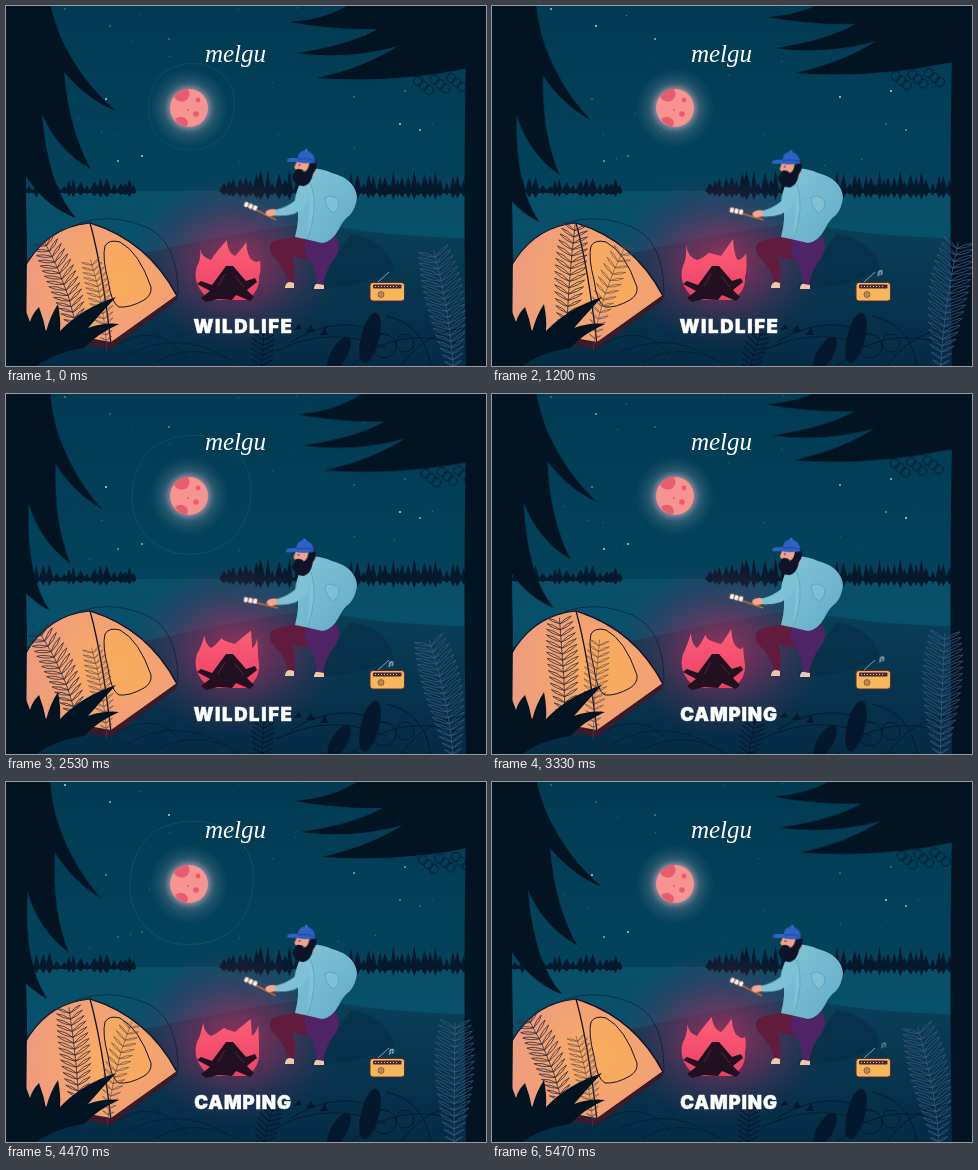
Animation of 480x360 px, one loop 5.54 s. Source, as an HTML page:

```html
<!DOCTYPE html>
<html lang="en">
<head>
<meta charset="utf-8">
<title>Campfire night</title>
<style>
  :root { --loop: 5540ms; --third: 1846.67ms; --ease: cubic-bezier(.37, 0, .63, 1); }
  html, body { margin: 0; width: 100%; height: 100%; overflow: hidden; background: #033a54; }
  svg { display: block; width: 100vw; height: 100vh; }

  .sway { animation: 923.33ms var(--ease) infinite alternate; }
  .left { transform-origin: 20px 0; animation-name: left; animation-delay: -30ms; }
  .right { transform-origin: 470px 40px; animation-name: right; animation-delay: -461.67ms; }
  @keyframes left { from { transform: rotate(0); } to { transform: rotate(8deg); } }
  @keyframes right { from { transform: translate(-10px, -7px); } to { transform: translate(10px, 5px); } }

  .breath { animation: 2770ms var(--ease) -670ms infinite alternate; }
  .arm { transform-origin: 302px 178px; animation-name: arm; }
  .stick { transform-origin: 266px 210px; animation-name: stick; }
  .head { transform-origin: 303px 176px; animation-name: head; }
  @keyframes arm { from { transform: rotate(1.4deg); } to { transform: rotate(-1.4deg); } }
  @keyframes stick { from { transform: rotate(6deg); } to { transform: rotate(-7deg); } }
  @keyframes head { from { transform: translateY(-.8px) rotate(2deg); } to { transform: translateY(.8px) rotate(-2deg); } }

  .ring { transform-origin: 185px 101px; animation: ring var(--third) linear infinite; }
  @keyframes ring {
    from { transform: scale(.71); opacity: .5; }
    45% { transform: scale(1.04); opacity: .4; }
    70%, to { transform: scale(1.22); opacity: 0; }
  }
  .note { animation: note var(--third) linear infinite; }
  @keyframes note {
    0%, 20% { transform: translate(-3px, 3px); opacity: 0; }
    32% { transform: translate(0, 0); opacity: 1; }
    94% { transform: translate(7px, -7px); opacity: 1; }
    100% { transform: translate(8px, -8px); opacity: 0; }
  }
  .star { animation: twinkle 1385ms ease-in-out infinite alternate; }
  @keyframes twinkle { from { opacity: .25; } to { opacity: .9; } }

  text { fill: #fff; text-anchor: middle; }
  .brand { font: italic 25px "Liberation Serif", serif; }
  .word { font: 900 18.5px Inter, sans-serif; stroke: #fff; stroke-width: .5; animation: swap var(--loop) step-end infinite; }
  .second { animation-delay: -2770ms; }
  @keyframes swap { 0% { opacity: 1; } 50%, 100% { opacity: 0; } }
</style>
</head>
<body>
<svg viewBox="0 0 480 360" preserveAspectRatio="none">
  <defs>
    <linearGradient id="sky" x2="0" y2="1">
      <stop stop-color="#023a53"/><stop offset="1" stop-color="#04435d"/>
    </linearGradient>
    <linearGradient id="water" x2="0" y2="1">
      <stop stop-color="#084f68"/><stop offset="1" stop-color="#06506c"/>
    </linearGradient>
    <linearGradient id="ground" x2="0" y2="1">
      <stop stop-color="#0a3f58"/><stop offset=".5" stop-color="#07354f"/><stop offset="1" stop-color="#052b45"/>
    </linearGradient>
    <radialGradient id="halo">
      <stop offset=".4" stop-color="#e9b9c0" stop-opacity=".75"/>
      <stop offset=".62" stop-color="#7f93a5" stop-opacity=".32"/>
      <stop offset="1" stop-color="#2d6680" stop-opacity="0"/>
    </radialGradient>
    <radialGradient id="glow">
      <stop stop-color="#c52f5e" stop-opacity=".75"/>
      <stop offset=".4" stop-color="#9b2c5b" stop-opacity=".52"/>
      <stop offset=".7" stop-color="#7a2f5c" stop-opacity=".25"/>
      <stop offset="1" stop-color="#5f2b58" stop-opacity="0"/>
    </radialGradient>
    <linearGradient id="flame" x2="0" y2="1">
      <stop stop-color="#fb5f78"/><stop offset="1" stop-color="#ee3f65"/>
    </linearGradient>
    <radialGradient id="canvas" gradientUnits="userSpaceOnUse" cx="112" cy="275" r="95">
      <stop stop-color="#fbb256"/><stop offset=".4" stop-color="#f5a76c"/><stop offset="1" stop-color="#ee9a80"/>
    </radialGradient>
    <linearGradient id="jacket" x2="1" y2="1">
      <stop stop-color="#83c6d8"/><stop offset="1" stop-color="#62aac8"/>
    </linearGradient>
  </defs>

  <rect width="480" height="190" fill="url(#sky)"/>
  <g id="stars" fill="#d4eaf2"/>
  <path class="ring" d="M185 40Q229 40 244 78Q252 112 231 142Q207 166 168 160Q131 149 125 111Q123 73 148 51Q165 41 185 40Z" fill="none" stroke="#4b8ba1" stroke-width=".6"/>
  <circle cx="183" cy="102" r="41" fill="url(#halo)"/>
  <circle cx="183" cy="102" r="19" fill="#f79391"/>
  <g fill="#e85c70">
    <path d="M168 91Q174 82 182 83Q186 91 179 95Q172 97 168 91Z"/>
    <circle cx="192" cy="94" r="2.4"/><circle cx="190" cy="108" r="2.8"/><circle cx="182" cy="104" r="1"/>
    <path d="M169 113Q176 108 181 114Q183 119 180 121Q172 119 169 113Z"/>
  </g>

  <rect y="185" width="480" height="70" fill="url(#water)"/>
  <path id="trees" fill="#04192b"/>
  <path d="M0 252Q90 254 144 246Q230 227 294 218Q330 220 360 225T480 233V360H0Z" fill="url(#ground)"/>
  <ellipse cx="230" cy="256" rx="108" ry="88" fill="url(#glow)"/>
  <path d="M305 282Q350 284 388 264Q382 234 345 228Z" fill="#042a43" opacity=".5"/>

  <!-- shrubs -->
  <g fill="#03182c">
    <ellipse cx="364" cy="332" rx="9" ry="26" transform="rotate(14 364 332)"/>
    <ellipse cx="333" cy="348" rx="8" ry="19" transform="rotate(30 333 348)"/>
    <path d="M288 324l5-6 3 5zM300 326l5-7 4 7zM314 329l5-8 3 8z"/>
  </g>
  <g fill="none" stroke="#03182e" stroke-width=".9">
    <path d="M285 336Q335 305 382 330M270 345Q325 318 380 342M380 310Q418 318 425 360M345 360Q390 318 452 338M395 360Q420 325 460 322"/>
    <circle cx="378" cy="340" r="12"/><circle cx="399" cy="337" r="9"/>
    <path d="M40 238Q85 198 140 221Q172 235 172 288M100 345Q150 310 180 352M120 350Q170 322 222 352M150 356Q190 334 232 358" stroke-width=".6"/>
  </g>
  <path id="fernMid" class="fern" fill="none" stroke="#03172d"/>

  <!-- tent -->
  <g stroke="#141326" stroke-linejoin="round">
    <path d="M84 217Q38 221 15 268V322L105 338L171 290Q142 235 84 217Z" fill="url(#canvas)" stroke-width="1.2"/>
    <path d="M84 217Q96 260 105 338L171 290Q142 235 84 217Z" fill="#ef9b76" fill-opacity=".4" stroke-width="1.3"/>
    <path d="M99 240Q103 233 114 236Q133 246 145 281Q146 289 138 294Q124 302 113 301Q105 297 102 274Q96 251 99 240Z" fill="#f9ae59" fill-opacity=".6" stroke-width="1"/>
    <path d="M15 320L105 336L171 289V294L105 343L15 328Z" fill="#3a1a2b" stroke="none"/>
  </g>
  <path id="fernA" class="fern" fill="none" stroke="#2b2a3f"/>
  <path id="fernB" class="fern" fill="none" stroke="#5a4550" opacity=".75"/>

  <!-- fire -->
  <path id="fire" fill="url(#flame)"/>
  <path d="M191 278L195 275L206 279L220 260H227L240 275L249 272L251 276L241 284L248 291L244 295L230 289L226 294L212 293L200 296L195 292L204 285Z" fill="#21101f"/>
  <path d="M212 280l7-12M229 270l9 11" stroke="#5d2339" fill="none"/>

  <!-- camper -->
  <path d="M322 231Q282 229 267 236Q260 242 268 252Q279 262 282 277H288Q290 261 286 250Q307 258 325 249Z" fill="#611b3d"/>
  <path d="M301 233L331 231Q336 242 329 252Q319 264 317 280H311Q310 261 301 250Q296 242 301 233Z" fill="#4f2466"/>
  <path d="M279 281Q280 276 284 276L288 277V282H279ZM308 282Q309 277 312 278L318 279V283H308Z" fill="#edc7aa"/>
  <path d="M301 163Q313 161 326 167Q349 173 351 191Q350 202 344 209Q337 214 333 223Q326 236 316 237Q300 233 289 231Q294 212 291 199Q289 181 301 163Z" fill="url(#jacket)"/>
  <path d="M305 178Q313 203 301 234M319 192Q326 187 333 195Q333 204 327 207Q320 203 319 192Z" fill="#9ad2df" fill-opacity=".35" stroke="#5392b0" stroke-width=".6"/>
  <g class="breath arm">
    <g class="breath stick">
      <path d="M240 202L271 214" stroke="#bd6938" stroke-width="1.6"/>
      <g fill="#fff0e8" stroke="#b7918f" stroke-width=".4">
        <rect id="mallow" x="238" y="199" width="3.8" height="5" rx="1.2" transform="rotate(18 240 202)"/>
        <use href="#mallow" x="4.5" y="1.3"/><use href="#mallow" x="9" y="2.6"/>
      </g>
    </g>
    <path d="M298 174Q305 176 305 186Q302 202 289 208Q279 211 269 210L268 205Q281 202 289 195Q290 182 298 174Z" fill="#7fc2d5"/>
    <path d="M270 204Q263 203 260 207Q260 211 265 211L270 210Z" fill="#f5a68d"/>
  </g>
  <g class="breath head">
    <path d="M291 155H308L309 168Q302 174 292 170L288 162Z" fill="#f4a18c"/>
    <path d="M304 154H309Q312 162 307 168Q305 179 298 181Q289 181 286 172Q287 166 293 167Q300 168 302 162Z" fill="#0d1428"/>
    <path d="M289 165Q293 162 298 166L295 169H289Z" fill="#0d1428"/>
    <circle cx="293" cy="160" r=".8" fill="#0d1428"/>
    <path d="M291 156Q290 146 299 145Q307 146 309 157Q299 159 290 157L281 157Q279 154 284 153H291Z" fill="#2d61c4"/>
    <path d="M291 154Q299 152 308 155" stroke="#1b459d" fill="none"/>
    <circle cx="299.500" cy="145" r="1.3" fill="#3f76d7"/>
  </g>

  <!-- radio -->
  <path d="M371 277L383 266" stroke="#a9b9bd" stroke-width=".8"/>
  <rect x="364" y="276.500" width="34.500" height="18.500" rx="3" fill="#f6b75c" stroke="#5c2833"/>
  <rect x="367" y="278.500" width="28.500" height="4" rx="1" fill="#432638"/>
  <path d="M369 280.500h24" stroke="#f6c578" stroke-dasharray="1 2"/>
  <circle cx="375" cy="288.500" r="3" fill="#b98a55" stroke="#70363a" stroke-width=".6"/>
  <path class="note" d="M383 273V269L386 268.500V272M383 273h-1.200M386 272h-1.200" fill="none" stroke="#e5f2f3" stroke-width=".9"/>

  <!-- framing foliage -->
  <g fill="#021322">
    <path d="M0 0H28Q17 100 21 240L20 360H0ZM480 0V360H460Q457 190 460 50Z"/>
    <path class="sway left" d="M-30 -30H40Q44 10 58 38Q78 78 110 105Q82 94 58 66Q63 124 85 163Q52 145 36 108Q42 180 70 212Q36 200 14 160L-30 170Z"/>
    <g class="sway right">
      <path d="M520 -40H390Q345 14 284 17Q328 25 372 24Q341 41 290 48Q342 55 392 41Q360 62 311 73Q394 78 462 63L520 58Z"/>
      <path id="berries" fill="none" stroke="#02162a" stroke-width=".8"/>
    </g>
    <path d="M0 360V280Q16 292 24 316Q26 308 33 301Q38 314 40 326Q44 310 52 298Q55 314 54 325Q76 302 110 291Q96 306 82 322Q98 316 113 318Q91 328 78 342Q50 346 30 360Z"/>
  </g>
  <path id="fernR" class="fern" fill="none" stroke="#3b587a"/>

  <text class="brand" x="229.500" y="56">melgu</text>
  <text class="word" x="237.500" y="326.500" letter-spacing="1.6">WILDLIFE</text>
  <text class="word second" x="237" y="326.500" letter-spacing=".9">CAMPING</text>
</svg>
<script>
  const LOOP = 5540;
  const get = id => document.getElementById(id);
  const setPath = (id, d) => get(id).setAttribute("d", d);
  const fix = n => n.toFixed(1);

  let seed = 17;
  const random = () => (seed = seed * 16807 % 2147483647) / 2147483647;

  // Pines along the horizon, with short reflections.
  function pines(from, to, height) {
    let d = `M${from} 183.5H${to}V187H${from}Z`;
    for (let x = from + 3; x < to - 2; x += 4 + random() * 4) {
      const h = height * (.3 + random() * .7), w = 3 + random() * 2;
      d += `M${fix(x - w)} 185L${fix(x)} ${fix(185 - h)}L${fix(x + w)} 185L${fix(x)} ${fix(186 + h * .4)}Z`;
    }
    return d;
  }
  setPath("trees", pines(20, 130, 16) + pines(215, 312, 22) + pines(342, 462, 21));

  let berries = "";
  for (let i = 0; i < 9; i++) {
    const x = 412 + i * 5.5, y = 76 + (i % 3) * 5 - i * .5;
    berries += `M${x - 4.5} ${y}a4.5 4.5 0 1 0 9 0a4.5 4.5 0 1 0 -9 0`;
  }
  setPath("berries", berries);

  const brightStars = [[104, 20], [59, 3], [163, 33], [348, 91], [399, 85], [112, 155], [414, 124], [100, 93], [136, 150], [394, 118]];
  const dimStars = Array.from({ length: 26 }, () => [40 + random() * 410, random() * 170]);
  [...brightStars, ...dimStars].forEach(([x, y], i) => {
    const star = document.createElementNS("http://www.w3.org/2000/svg", "circle");
    star.setAttribute("class", "star");
    star.setAttribute("cx", x);
    star.setAttribute("cy", y);
    star.setAttribute("r", i < brightStars.length ? 1 : .4);
    star.style.animationDelay = -random() * 2770 + "ms";
    get("stars").append(star);
  });

  // A bent stem with paired, outlined leaflets.
  function fern(id, bx, by, tx, ty, size, count = 17) {
    const cx = bx + (tx - bx) * .15, cy = (by + ty) / 2;
    let d = `M${bx} ${by}Q${fix(cx)} ${fix(cy)} ${fix(tx)} ${fix(ty)}`;
    for (let i = 2; i < count; i++) {
      const u = i / count, v = 1 - u;
      const x = v * v * bx + 2 * u * v * cx + u * u * tx;
      const y = v * v * by + 2 * u * v * cy + u * u * ty;
      const heading = Math.atan2(v * (cy - by) + u * (ty - cy), v * (cx - bx) + u * (tx - cx));
      const len = size * (.25 + .75 * Math.sin(Math.PI * (.2 + .8 * v)));
      for (const side of [-1, 1]) {
        const point = (r, turn) => {
          const a = heading + side * turn;
          return `${fix(x + r * Math.cos(a))} ${fix(y + r * Math.sin(a))}`;
        };
        const tip = point(len, 1.05);
        d += `M${fix(x)} ${fix(y)}Q${point(len * .6, .8)} ${tip}Q${point(len * .6, 1.3)} ${fix(x)} ${fix(y)}`;
      }
    }
    setPath(id, d);
  }
  document.querySelectorAll(".fern").forEach(el => el.setAttribute("stroke-width", .8));

  function drawFire(t) {
    const wave = (turns, phase, amp) => amp * Math.sin(2 * Math.PI * (turns * t / LOOP + phase));
    const peaks = [
      [196 + wave(6, .6, 3), 241 + wave(3, .1, 3)],
      [217 + wave(6, .2, 4), 241 + wave(3, .7, 7)],
      [242 + wave(3, .9, 3), 235 + wave(6, .4, 2)],
      [253 + wave(6, .1, 2), 249 + wave(3, .3, 6)]
    ];
    const notches = [[205, 254], [229, 250], [246, 254]];
    let d = "M204 294Q185 279 191 260";
    peaks.forEach(([x, y], i) => {
      const start = i ? notches[i - 1] : [191, 260];
      d += `Q${fix(start[0] + 4)} ${fix((start[1] + y) / 2 + 3)} ${fix(x)} ${fix(y)}`;
      const [nx, ny] = notches[i] || [253, 270];
      d += `Q${fix(x + 1)} ${fix(ny - 3)} ${nx} ${ny}`;
    });
    setPath("fire", d + "Q254 286 240 294Z");
  }

  function draw() {
    const t = performance.now() % LOOP;
    // Two swings per loop; `low` is the moment of the leftmost pose.
    const swing = low => -Math.cos(4 * Math.PI * (t - low) / LOOP);
    const a = swing(2475), b = swing(2680);
    fern("fernA", 74, 345, 58 + 26 * a, 227 - 9 * a, 18, 20);
    fern("fernB", 101, 345, 110 + 26 * b, 245 - 9 * b, 14);
    fern("fernR", 448, 372, 445 + 22 * a, 241 - 5 * a, 23, 21);
    fern("fernMid", 255, 385, 264 + 6 * b, 324, 13, 12);
    drawFire(t);
    requestAnimationFrame(draw);
  }
  draw();
</script>
</body>
</html>
```
